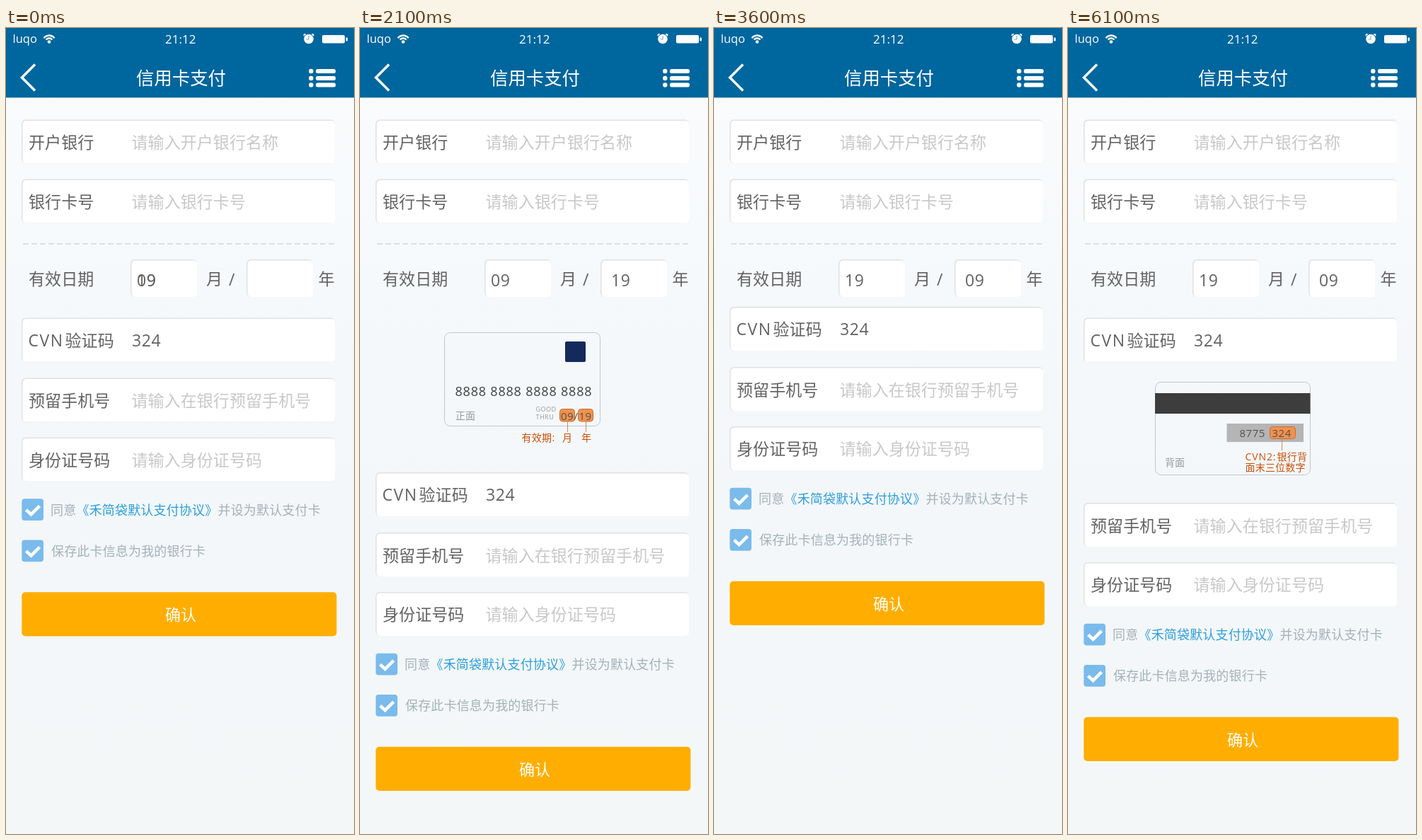
An HTML page with a canvas that plays this animation: 492 by 1139 pixels, repeating every 8 s.

```html
<!DOCTYPE html>
<html lang="zh-CN">
<head>
<meta charset="utf-8">
<title>信用卡支付</title>
<style>
html, body { margin: 0; width: 100%; height: 100%; overflow: hidden; }
canvas { display: block; width: 492px; height: 1139px; }
</style>
</head>
<body>
<canvas id="stage" width="492" height="1139"></canvas>
<script>
const ctx = document.getElementById('stage').getContext('2d');
const FONT = '"Open Sans", "Noto Sans CJK SC", "Noto Sans CJK", sans-serif';
const LOOP = 8000;
const INK = '#626262', HINT = '#c8c8c8', NOTE = '#a4b1b9', ORANGE = '#c9500a';

// cvn and rest are vertical shifts of the CVN row and of everything below it.
const STATES = [
  { at: 0, month: ['09', '19'], year: '', cvn: 0, rest: 0 },
  { at: 100, month: ['19'], year: '', cvn: -14.5, rest: -14.5 },
  { at: 600, month: ['19'], year: '', cvn: 218.5, rest: 218.5, card: drawFront },
  { at: 2100, month: ['09'], year: '19', cvn: 218.5, rest: 218.5, card: drawFront },
  { at: 2600, month: ['19'], year: '09', cvn: 218.5, rest: 218.5, card: drawFront },
  { at: 3100, month: ['19'], year: '09', cvn: 240.3, rest: 240.3, card: drawFront },
  { at: 3600, month: ['19'], year: '09', cvn: -15.5, rest: -15.5 },
  { at: 4600, month: ['19'], year: '09', cvn: 0, rest: 0 },
  { at: 5600, month: ['19'], year: '09', cvn: 0, rest: -12.5 },
  { at: 6100, month: ['19'], year: '09', cvn: 0, rest: 176.5, card: drawBack }
];

// cy is the optical middle of the glyphs.
function text(str, x, cy, size, color, spacing = 0, weight = 400) {
  ctx.font = `${weight} ${size}px ${FONT}`;
  ctx.letterSpacing = `${spacing}px`;
  ctx.fillStyle = color;
  ctx.fillText(str, x, cy + size * 0.37);
}

function box(x, y, w, h, r, fill, stroke) {
  ctx.beginPath();
  ctx.roundRect(x, y, w, h, r);
  if (fill) {
    ctx.fillStyle = fill;
    ctx.fill();
  }
  if (stroke) {
    ctx.strokeStyle = stroke;
    ctx.lineWidth = 1;
    ctx.stroke();
  }
}

function line(points, color, width) {
  ctx.beginPath();
  points.forEach(([x, y]) => ctx.lineTo(x, y));
  ctx.strokeStyle = color;
  ctx.lineWidth = width;
  ctx.stroke();
}

function disc(x, y, r, color) {
  ctx.beginPath();
  ctx.arc(x, y, r, 0, Math.PI * 2);
  ctx.fillStyle = color;
  ctx.fill();
}

function input(x, y, w, h) {
  box(x, y, w, h, 6, '#dfe1e2');
  box(x + 1.5, y + 1.5, w - 1.5, h - 1.5, 5, '#fff');
}

const label = (str, x, cy) => text(str, x, cy, 23, INK, 0.07);
const digits = (str, x, cy) => text(str, x, cy, 23, INK, 0.6);

function row(name, hint, y) {
  input(22, y, 443, 62);
  label(name, 32, y + 32);
  text(hint, 177.5, y + 32, 23, HINT, 0.07);
}

function check(y) {
  box(22.3, y, 30.7, 30.7, 4, '#7abbec');
  line([[28.5, y + 15.5], [35.5, y + 22], [47.5, y + 10]], '#fff', 4.5);
}

function drawHeader() {
  ctx.fillStyle = '#00669e';
  ctx.fillRect(0, 0, 492, 98.4);
  text('luqo', 9.5, 15, 16.5, '#fff');
  text('21:12', 225, 16, 17, '#fff', 0, 500);

  for (const r of [9.5, 5.5]) {
    ctx.beginPath();
    ctx.arc(61, 20, r, -Math.PI * 0.79, -Math.PI * 0.21);
    ctx.strokeStyle = '#fff';
    ctx.lineWidth = 2.4;
    ctx.stroke();
  }
  disc(61, 19.5, 2.3, '#fff');

  disc(422.5, 10, 2, '#fff');
  disc(433.5, 10, 2, '#fff');
  disc(428, 15.5, 7.6, '#00669e');
  disc(428, 15.5, 6.8, '#fff');
  line([[428, 11], [428, 16], [424.5, 16]], '#6bb4dc', 1.2);

  box(447, 10, 32, 11.5, 2, '#fff');
  box(480.5, 13.5, 2.5, 5, 1, '#fff');

  line([[41, 51.5], [22.5, 70], [41, 88.5]], '#fff', 3.5);
  text('信用卡支付', 184, 70.5, 25.4, '#fff', 0, 500);
  for (const y of [61, 71, 80.5]) {
    disc(431.3, y, 3.2, '#fff');
    box(438, y - 3, 28, 6, 2.5, '#fff');
  }
}

function drawFront() {
  box(119.5, 430.5, 220, 132, 8, null, '#c3c7ca');
  box(290, 443, 29, 29, 2, '#14295c');
  text('8888 8888 8888 8888', 134.5, 513, 18, '#404040', 0.8);
  text('正面', 135, 548, 14, '#999');
  text('GOOD', 248.5, 539, 9, '#999', 0.5);
  text('THRU', 248.5, 550, 9, '#999', 0.5);
  box(282.5, 538.5, 21, 17.5, 4, '#f0924d', '#cb6a32');
  box(308.5, 538.5, 21, 17.5, 4, '#f0924d', '#cb6a32');
  text('09', 284, 548, 15, '#505050', 0.4);
  text('/', 302.5, 548, 15, '#505050');
  text('19', 309.5, 548, 15, '#505050', 0.4);
  line([[293.5, 556], [293.5, 571]], '#d58a5e', 1);
  line([[319.5, 556], [319.5, 571]], '#d58a5e', 1);
  text('有效期:', 228.5, 578.5, 14, ORANGE, 0.3);
  text('月', 286, 578.5, 14, ORANGE);
  text('年', 313, 578.5, 14, ORANGE);
}

function drawBack() {
  box(123.5, 500.5, 219, 131, 8, null, '#c3c7ca');
  ctx.fillStyle = '#3d3d3d';
  ctx.fillRect(123, 516, 219.5, 29);
  ctx.fillStyle = '#b5b5b5';
  ctx.fillRect(224.5, 559, 108.5, 26);
  box(285.5, 563.5, 36, 17, 4, '#f0924d', '#cb6a32');
  text('8775', 242.5, 572.5, 15, '#505050', 0.5);
  text('324', 288.5, 572.5, 15, '#505050', 0.5);
  line([[302.5, 581], [302.5, 597]], '#d58a5e', 1);
  text('CVN2:', 250.5, 606, 14, ORANGE, 0.9);
  text('银行背', 295.5, 606, 14, ORANGE, 0.2);
  text('面末三位数字', 250.5, 621, 14, ORANGE, 0.2);
  text('背面', 137, 614, 14, '#999');
}

function drawDate(state) {
  ctx.setLineDash([8, 4]);
  line([[24, 305], [464, 305]], '#dcdfe1', 2);
  ctx.setLineDash([]);
  label('有效日期', 32, 354.5);
  input(176, 327, 94, 53);
  input(340, 327, 94, 53);
  label('月', 283, 354.5);
  label('/', 315, 355);
  label('年', 441.5, 354.5);
  state.month.forEach(value => digits(value, 185, 356.5));
  digits(state.year, 355, 356.5);
}

function drawCvn(y) {
  input(22, y, 443, 62);
  text('CVN', 31.5, y + 31.5, 23, INK, 1.5);
  label('验证码', 83.5, y + 31.5);
  digits('324', 178, y + 31.5);
}

function drawRest(dy) {
  row('预留手机号', '请输入在银行预留手机号', 494.5 + dy);
  row('身份证号码', '请输入身份证号码', 578.4 + dy);

  check(665.3 + dy);
  const cy = 681 + dy;
  text('同意', 63, cy, 18, NOTE, 0.17);
  text('《禾简袋默认支付协议》', 99.5, cy, 18, '#2f9fdd', 0.17);
  text('并设为默认支付卡', 299.5, cy, 18, NOTE, 0.17);

  check(723.6 + dy);
  text('保存此卡信息为我的银行卡', 64, 739.3 + dy, 18, NOTE, 0.17);

  box(22.3, 797.3 + dy, 445.1, 62.2, 5, '#ffae00');
  text('确认', 225, 829 + dy, 22, '#fff');
}

function draw(time) {
  const state = STATES.findLast(s => s.at <= time);
  const sky = ctx.createLinearGradient(0, 98, 0, 1139);
  sky.addColorStop(0, '#f9fbfd');
  sky.addColorStop(0.5, '#f3f7f9');
  sky.addColorStop(1, '#f3f7f8');
  ctx.fillStyle = sky;
  ctx.fillRect(0, 0, 492, 1139);

  drawHeader();
  row('开户银行', '请输入开户银行名称', 129.5);
  row('银行卡号', '请输入银行卡号', 213.5);
  drawDate(state);
  drawCvn(409.6 + state.cvn);
  if (state.card) state.card();
  drawRest(state.rest);
}

const start = performance.now();
function tick() {
  draw((performance.now() - start) % LOOP);
  requestAnimationFrame(tick);
}
tick();
</script>
</body>
</html>
```
